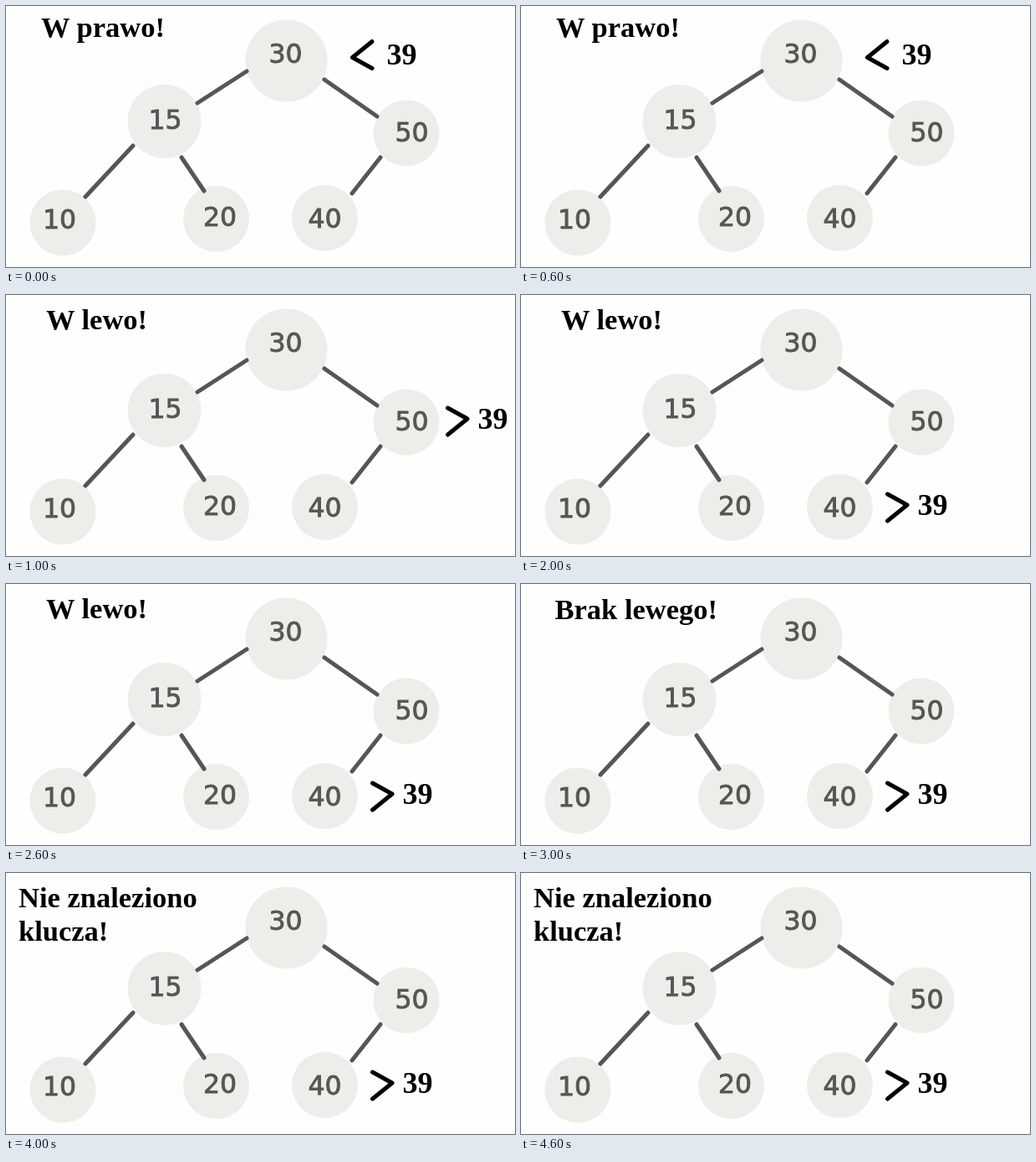
An HTML page for the animation above (5000 ms loop, 609 by 312 pixels).

```html
<!DOCTYPE html>
<html lang="pl">
<head>
<meta charset="utf-8">
<title>Wyszukiwanie w drzewie BST</title>
<style>
  html, body { margin: 0; width: 100%; height: 100%; overflow: hidden; background: #fefefc; }
  svg { display: block; width: 609px; height: 312px; }
  #nodes circle { fill: #eceeea; }
  #nodes text {
    font: 31.5px "DejaVu Sans", sans-serif;
    fill: #555753; stroke: #555753; stroke-width: .9; text-anchor: middle;
  }
  #edges { stroke: #555753; stroke-width: 5; stroke-linecap: round; }
  #note { font: bold 34.5px "Liberation Serif", serif; }
  #key { font: bold 36px "Liberation Serif", serif; }
  #sign { fill: none; stroke: #000; stroke-width: 5; stroke-linecap: round; stroke-linejoin: round; }
</style>
</head>
<body>
<svg viewBox="0 0 609 312">
  <g id="nodes"></g>
  <path id="edges" d="M288 78L229 116M381 88L444 132M152 167L95 228M210 181L237 221M448 181L414 224"/>
  <text id="note"></text>
  <g id="key">
    <path id="sign" d="M-36 -25L-12.5 -12L-36 7"/>
    <text>39</text>
  </g>
</svg>
<script>
const STEP = 1000;
const LINE_HEIGHT = 40;
const $ = id => document.getElementById(id);

// The label is centred at an offset from the middle of the circle.
function node(value, x, y, dx, dy, r = 39.5) {
  return `<circle cx="${x}" cy="${y}" r="${r}"/>
    <text x="${x + dx}" y="${y + dy}" dy=".36em">${value}</text>`;
}

$('nodes').innerHTML =
  node(30, 335.5, 65.5, -1, -9, 49) +
  node(15, 189.5, 138, 1, -2.5, 44) +
  node(50, 479, 152, 6.5, -1.5) +
  node(10, 68, 259, -4, -4.5) +
  node(20, 251.5, 254.5, 4.5, -3) +
  node(40, 381.5, 253.5, 0, 0);

const atRoot = { x: 455.5, y: 69.5, turn: 180 };
const atRight = { x: 564.5, y: 160, turn: 0 };
const atLeaf = { x: 474.5, y: 263, turn: 0 };

const steps = [
  { note: 'W prawo!', x: 42, y: 37, key: atRoot },
  { note: 'W lewo!', x: 48, y: 41, key: atRight },
  { note: 'W lewo!', x: 48, y: 41, key: atLeaf },
  { note: 'Brak lewego!', x: 40.5, y: 42, key: atLeaf },
  { note: 'Nie znaleziono\nklucza!', x: 15, y: 41, key: atLeaf }
];

function render(time) {
  const { note, x, y, key } = steps[Math.floor(time / STEP) % steps.length];
  $('note').innerHTML = note.split('\n').map((line, i) =>
    `<tspan x="${x}" y="${y + i * LINE_HEIGHT}">${line}</tspan>`).join('');
  $('key').setAttribute('transform', `translate(${key.x} ${key.y})`);
  $('sign').setAttribute('transform', `rotate(${key.turn} -26.75 -10)`);
}

const start = performance.now();
function tick() {
  render(performance.now() - start);
  requestAnimationFrame(tick);
}
tick();
</script>
</body>
</html>
```
